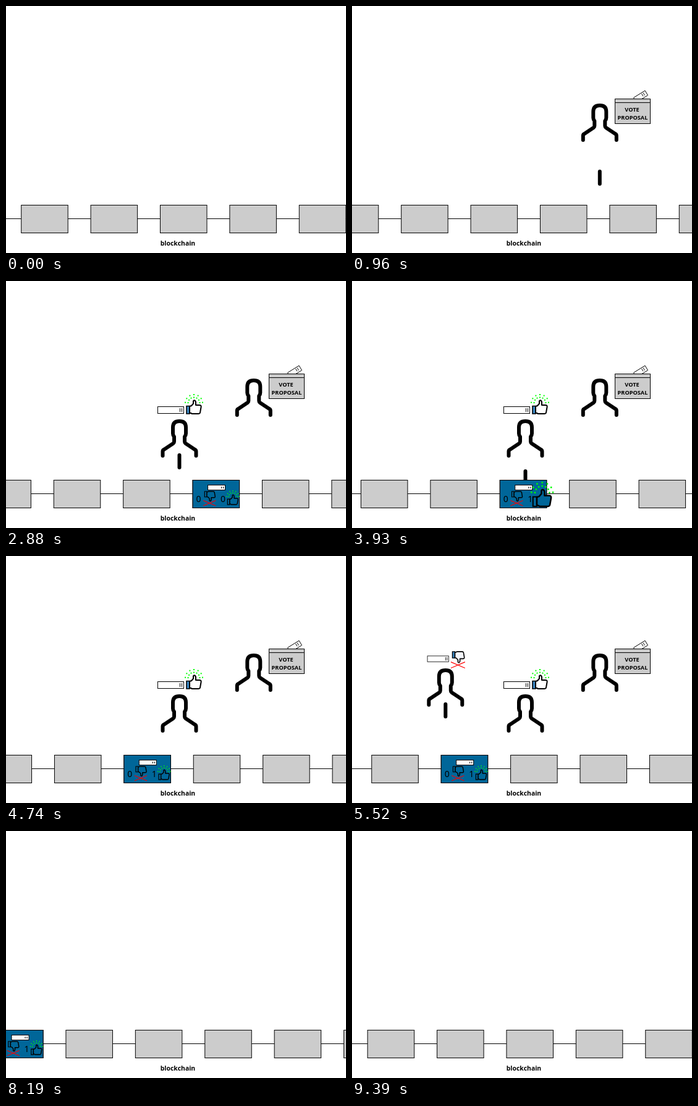
Animation, 550 px wide and 400 px high, one loop 9.42 s. Source, as an HTML page:

```html
<!DOCTYPE html>
<html lang="en">
<head>
<meta charset="utf-8">
<title>Voting on a blockchain</title>
<style>
html, body { margin: 0; width: 100%; height: 100%; overflow: hidden; background: #fff; }
svg { display: block; width: 550px; height: 400px; }
text { font-family: "Noto Sans", "Open Sans", sans-serif; text-anchor: middle; }
.label { font-weight: 700; }
.line { fill: none; stroke: #000; }
.person { fill: none; stroke: #000; stroke-width: 6; stroke-linecap: round; stroke-linejoin: round; }
</style>
</head>
<body>
<svg viewBox="0 0 550 400">
  <defs>
    <path id="body" class="person" d="M-27 59V52Q-27 50 -25 49L-10 39Q-8.5 38 -8.5 36V28Q-10.5 26 -10.5 23V13Q-10.5 3 0 3Q10.5 3 10.5 13V23Q10.5 26 8.5 28V36Q8.5 38 10 39L25 49Q27 50 27 52V59"/>
    <g id="hand" stroke="#000" stroke-width="2" stroke-linejoin="round">
      <path d="M6 11L9 10L12 6.5V2.5Q12.3 1 14 1.2Q16 2 16 5V9H22Q25 9 24.6 12L23 21Q22.5 23 20 23H10L6 21Z"/>
    </g>
    <path id="cuff" d="M1 10.5H6V23H1Z" stroke="#000" stroke-width="1.6"/>
    <path id="cross" d="M-2 21.5L26 33.5M-2 33.5L26 21.5" fill="none" stroke="#f00" stroke-width="1.5"/>
    <g id="sparks" fill="#0f0"></g>
  </defs>
  <g id="people"></g>
  <g id="stems" stroke="#000" stroke-width="6" stroke-linecap="round"></g>
  <path class="line" d="M0 344.5H550"/>
  <g id="chain"></g>
  <g id="ledger"></g>
  <text class="label" x="278" y="388" font-size="10.4">blockchain</text>
</svg>
<script>
const LOOP = 9420, STEP = 30, PITCH = 112.4, SPEED = 0.0598, START = 474.3;
const RECORDED = 1200, LEAVE = 7200, GONE = 7560;

const $ = id => document.getElementById(id);
const clamp = v => Math.max(0, Math.min(1, v));
const progress = (t, from, to) => clamp((t - from) / (to - from));
const easeOut = p => 1 - (1 - p) ** 2;
const scaleAt = (x, y, s) => `translate(${x} ${y}) scale(${s}) translate(${-x} ${-y})`;
const show = (el, on) => el.setAttribute("display", on ? "inline" : "none");

// Two dots on each of seven rays above the thumb
$("sparks").innerHTML = Array.from({ length: 14 }, (_, i) => {
  const angle = Math.PI * (0.03 + 0.94 * (i >> 1) / 6), r = i % 2 ? 9.5 : 14;
  const x = 13 - r * Math.cos(angle), y = 6 - r * Math.sin(angle);
  return `<rect x="${x - 1}" y="${y - 1}" width="2" height="2"/>`;
}).join("");

const thumb = (cuff, palm) => `<use href="#cuff" fill="${cuff}"/><use href="#hand" fill="${palm}"/>`;
const up = (...fills) => thumb(...fills) + '<use href="#sparks"/>';
const down = (...fills) =>
  `<g transform="translate(0 24) scale(1 -1)">${thumb(...fills)}</g><use href="#cross"/>`;
const ballot = (x, y, w, h) => {
  const right = x + w;
  return `<rect x="${x}" y="${y}" width="${w}" height="${h}" fill="#fff" stroke="#000"/>
    <path class="line" d="M${right - 6} ${y + 2.5}V${y + h - 2.5}M${right - 3} ${y + 2.5}V${y + h - 2.5}"/>`;
};

const urn = `<path d="M455.5 148.5L474 137L478.5 144.5L460 156Z" fill="#fff" stroke="#000"/>
  <path class="line" d="M468.5 142L471 146.2M471 140.5L473.5 144.7"/>
  <rect x="425.5" y="150.5" width="57" height="40" fill="#ccc" stroke="#000"/>
  <path class="line" d="M425.5 156.5H482.5"/>
  <g class="label" font-size="9.2"><text x="453" y="170.5">VOTE</text><text x="454" y="184">PROPOSAL</text></g>`;

const people = [
  { x: 400.8, y: 158, enter: 30, act: 240, actEnd: 450, drop: 480,
    prop: urn, cx: 453, cy: 165 },
  { x: 280.5, y: 224, enter: 1980, act: 2400, actEnd: 2820, drop: 3417,
    prop: ballot(245.5, 203.5, 42, 11) + `<g transform="translate(291 192)">${up("#3a87c4", "#fff")}</g>`,
    cx: 281, cy: 204 },
  { x: 151.3, y: 182, enter: 4860, act: 5280, actEnd: 5700, drop: 5520,
    prop: ballot(115.5, 160.5, 42, 11.5) + `<g transform="translate(164 151)">${down("#3a87c4", "#f4f6fc")}</g>`,
    cx: 151, cy: 168 }
];

const addGroup = (parent, html) => {
  const g = document.createElementNS("http://www.w3.org/2000/svg", "g");
  g.innerHTML = html;
  return parent.appendChild(g);
};

for (const p of people) {
  p.figure = addGroup($("people"), `<use href="#body" x="${p.x}" y="${p.y}"/>`);
  p.item = addGroup($("people"), p.prop);
  p.stem = addGroup($("stems"), `<path d="M${p.x} 3V23"/>`);
}

$("chain").innerHTML = Array.from({ length: 12 }, (_, i) =>
  `<rect x="${(i - 5) * PITCH}" y="322.5" width="75.5" height="45" fill="#ccc" stroke="#000"/>`).join("");

$("ledger").innerHTML = `<rect y="322.5" width="75.5" height="45" fill="#069" stroke="#000"/>
  <g id="record">${ballot(24.5, 330.5, 28, 8)}
    <g font-size="14"><text id="noes" x="9.5" y="358">0</text><text id="ayes" x="49" y="358">0</text></g>
    <g id="noIcon"><g transform="translate(18.5 340) scale(.72)">${down("#069", "#069")}</g></g>
    <g id="yesIcon"><g transform="translate(55.5 345.5) scale(.72)">${up("#069", "#069")}</g></g>
  </g>`;

function pop(t, from) {
  const grow = progress(t, from, from + 180), shrink = progress(t, from + 180, from + 480);
  return 1 + 0.75 * (easeOut(grow) - shrink);
}

function draw(t) {
  const left = START - SPEED * t;
  const fade = 1 - progress(t, LEAVE, GONE);
  $("people").setAttribute("opacity", fade);

  for (const p of people) {
    const size = easeOut(progress(t, p.enter, p.enter + 300));
    show(p.figure, size > 0);
    p.figure.setAttribute("transform", scaleAt(p.x, p.y + 31, size));

    const propSize = easeOut(progress(t, p.act, p.actEnd));
    show(p.item, propSize > 0);
    p.item.setAttribute("transform", scaleAt(p.cx, p.cy, propSize));

    const fall = progress(t, p.drop, p.drop + 720), top = p.y + 55;
    show(p.stem, t >= Math.min(p.act + 240, p.drop) && fall < 1);
    p.stem.setAttribute("transform", `translate(0 ${top + (330 - top) * fall ** 2})`);
  }

  $("chain").setAttribute("transform", `translate(${left})`);
  show($("ledger"), t >= RECORDED);
  $("ledger").setAttribute("transform", `translate(${left})`);
  $("record").setAttribute("transform", scaleAt(38, 345, easeOut(progress(t, RECORDED, RECORDED + 300))));
  $("ayes").textContent = t >= 3780 ? 1 : 0;
  $("noes").textContent = t >= 5880 ? 1 : 0;
  $("yesIcon").setAttribute("transform", scaleAt(60, 358, pop(t, 3780)));
  $("noIcon").setAttribute("transform", scaleAt(23, 347, pop(t, 5880)));
}

const begin = performance.now();
function tick() {
  const t = (performance.now() - begin) % LOOP;
  draw(Math.floor(t / STEP) * STEP);
  requestAnimationFrame(tick);
}
tick();
</script>
</body>
</html>
```
